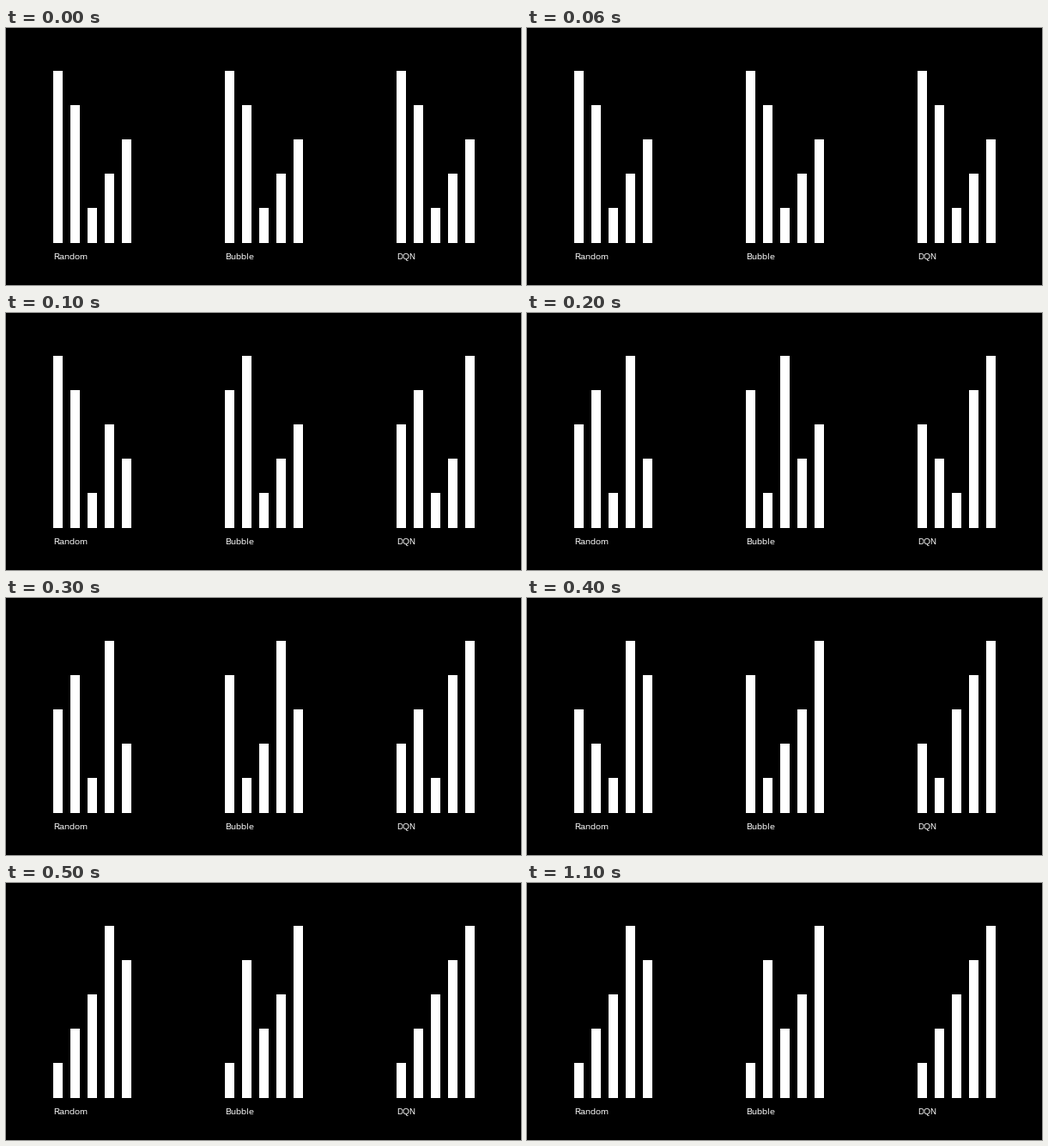
Write a matplotlib script that moves like this. It is 600 px wide and 300 px high and loops after 1500 ms.

```python
import matplotlib.pyplot as plt
from matplotlib.animation import FuncAnimation

W, H = 600, 300
DPI = 60
STEP_MS = 100
LOOP_STEPS = 15

BASE = 250
UNIT = 40
PITCH = 20
BAR_W = 11
BAR_FLOOR = BASE + 1

START = [5, 4, 1, 2, 3]

# One swap per step for each sorter; None leaves the bars alone.
SORTERS = [
    ("Random", 55, [(3, 4), (0, 3), None, (1, 4), (0, 2)]),
    ("Bubble", 255, [(0, 1), (1, 2), (2, 3), (3, 4), (0, 1)]),
    ("DQN", 455, [(0, 4), (1, 3), (0, 1), (1, 2), (0, 1)]),
]

plt.rcParams.update({
    "font.family": "Liberation Sans",
    "text.hinting": "native",
    "text.hinting_factor": 1,
    "toolbar": "None",
})


def state_at(swaps, step):
    values = START[:]
    for swap in swaps[:step]:
        if swap:
            a, b = swap
            values[a], values[b] = values[b], values[a]
    return values


fig = plt.figure(figsize=(W / DPI, H / DPI), dpi=DPI, facecolor="black")
ax = fig.add_axes([0, 0, 1, 1])
ax.set_xlim(0, W)
ax.set_ylim(H, 0)
ax.axis("off")

groups = []
for label, left, swaps in SORTERS:
    xs = [left + PITCH * i for i in range(len(START))]
    bars = ax.bar(xs, [0] * len(xs), width=BAR_W, align="edge",
                  color="white", linewidth=0, antialiased=False)
    ax.text(left, 270, label, color="white", fontsize=12,
            ha="left", va="baseline")
    groups.append((bars, swaps))

ax.set_xlim(0, W)
ax.set_ylim(H, 0)


def draw(step):
    for bars, swaps in groups:
        for bar, value in zip(bars, state_at(swaps, step)):
            top = BASE - UNIT * value
            bar.set_y(top)
            bar.set_height(BAR_FLOOR - top)
    return [bar for bars, _ in groups for bar in bars]


anim = FuncAnimation(fig, draw, frames=LOOP_STEPS, init_func=lambda: draw(0),
                     interval=STEP_MS, repeat=True, repeat_delay=0, blit=False)

plt.show()
```
